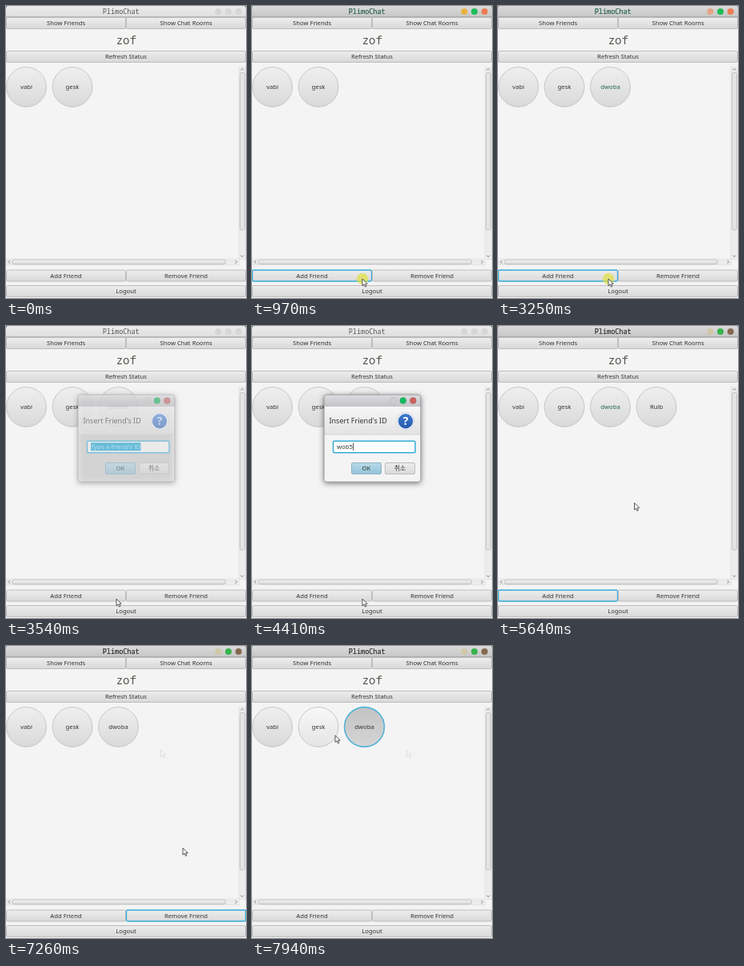
These frames come from a looping animation (300x366 px, 7.99 s). An HTML page with a canvas:

```html
<!DOCTYPE html>
<html lang="en">
<head>
<meta charset="utf-8">
<title>PlimoChat</title>
<style>
html, body { margin: 0; width: 100%; height: 100%; overflow: hidden; background: #f4f4f4; }
canvas { display: block; width: 300px; height: 366px; }
</style>
</head>
<body>
<canvas id="stage"></canvas>
<script>
const W = 300, H = 366, LOOP = 7990;
const SANS = '"Noto Sans", "Noto Sans CJK KR", "Noto Sans CJK", sans-serif';
const MONO = '"Noto Sans Mono", monospace';
const UI = '7.7px ' + SANS;
const BLUE = '#35acd8';
const canvas = document.getElementById('stage');
const ctx = canvas.getContext('2d');
const ratio = window.devicePixelRatio || 1;
canvas.width = W * ratio;
canvas.height = H * ratio;

// Piecewise linear track: rows of [time, value, ...]
function track(rows, t) {
  if (t <= rows[0][0]) return rows[0].slice(1);
  for (let i = 1; i < rows.length; i++) {
    const a = rows[i - 1], b = rows[i];
    if (t < b[0]) {
      const k = (t - a[0]) / (b[0] - a[0]);
      return a.slice(1).map((v, j) => v + (b[j + 1] - v) * k);
    }
  }
  return rows[rows.length - 1].slice(1);
}

const pointerPath = [
  [90, 246, 368], [180, 225, 349], [300, 182, 336], [400, 148, 338], [480, 138, 342],
  [5440, 138, 342], [5560, 152, 290], [5700, 184, 172], [5820, 198, 112], [5900, 199, 107],
  [6040, 198, 109], [6120, 193, 130], [6230, 184, 249],
  [6400, 177, 306], [6520, 180, 324], [6680, 245, 333],
  [7090, 245, 333], [7220, 232, 280], [7370, 192, 182], [7520, 150, 118], [7620, 141, 107],
  [7780, 140, 107], [7880, 129, 109], [7910, 117, 110], [7940, 104, 112]
];
const focusLevel = [
  [730, 0], [880, 1], [1090, 1], [1260, 0], [2410, 0], [2450, 1],
  [3390, 1], [3540, 0], [4769, 0], [4770, 1]
];
const dialogLevel = [
  [1090, 0], [1400, 1], [2400, 1], [2450, 0], [3390, 0], [3660, 1], [4769, 1], [4770, 0]
];
const clicks = [[730, 1080], [3250, 3400], [5880, 5980], [6850, 6960], [7640, 7740]];
const typing = [
  { steps: [1570, 1670, 1770, 1870, 2010], word: 'wob4', end: 2500 },
  { steps: [3830, 3920, 4010, 4110, 4410], word: 'wob5', end: 4800 }
];
const friends = [
  { name: 'vabi', x: 25.5, from: 0, to: LOOP },
  { name: 'gesk', x: 83, from: 0, to: LOOP, lit: 7900 },
  { name: 'dwoba', x: 140.5, from: 2430, to: LOOP, pick: [7640, LOOP], tint: 7100 },
  { name: 'Rulb', x: 198, from: 4770, to: 6960, pick: [5880, 6850] }
];

const within = (t, a, b) => t >= a && t < b;

function shade(y0, y1, top, bottom) {
  const g = ctx.createLinearGradient(0, y0, 0, y1);
  g.addColorStop(0, top);
  g.addColorStop(1, bottom);
  return g;
}

function paint(fill, stroke, line) {
  if (fill) { ctx.fillStyle = fill; ctx.fill(); }
  if (stroke) { ctx.strokeStyle = stroke; ctx.lineWidth = line; ctx.stroke(); }
}

function box(x, y, w, h, r, fill, stroke, line = 1) {
  ctx.beginPath();
  ctx.roundRect(x, y, w, h, r);
  paint(fill, stroke, line);
}

function disc(x, y, r, fill, stroke, line = 1) {
  ctx.beginPath();
  ctx.arc(x, y, r, 0, Math.PI * 2);
  paint(fill, stroke, line);
}

function label(s, x, y, color = '#333', font = UI, align = 'center') {
  ctx.font = font;
  ctx.textAlign = align;
  ctx.fillStyle = color;
  ctx.fillText(s, x, y);
}

function button(s, x, y, w, h, state = '') {
  const fill = state === 'pressed' ? shade(y, y + h, '#cbcbcb', '#d8d8d8')
    : state === 'default' ? shade(y, y + h, '#b9dcea', '#93c2d8')
    : shade(y, y + h, '#eeeeee', '#d8d8d8');
  const ring = state === 'focus' || state === 'pressed';
  box(x + .5, y + .5, w - 1, h - 1, 1.5, fill, ring ? BLUE : state ? '#8fb3c3' : '#bdbdbd', ring ? 1.3 : 1);
  label(s, x + w / 2, y + h / 2 + 2.8);
}

function arrow(x, y, turn) {
  ctx.save();
  ctx.translate(x, y);
  ctx.rotate(turn);
  ctx.beginPath();
  ctx.moveTo(-2, 1);
  ctx.lineTo(0, -1);
  ctx.lineTo(2, 1);
  paint(null, '#777', .9);
  ctx.restore();
}

function scrollbars() {
  box(291, 76.5, 8.5, 241, 0, '#ececec', '#e0e0e0', .6);
  box(0.5, 317, 291, 7.5, 0, '#ececec', '#e0e0e0', .6);
  box(292.5, 83.5, 6, 197, 2, '#e3e3e3', '#b9b9b9', .8);
  box(8, 318, 266.5, 5.5, 2, shade(318, 324, '#f0f0f0', '#d9d9d9'), '#b9b9b9', .8);
  arrow(295.3, 79.5, 0);
  arrow(295.3, 313.5, Math.PI);
  arrow(4, 320.8, -Math.PI / 2);
  arrow(287.5, 320.8, Math.PI / 2);
}

function titleBar(t, level) {
  ctx.fillStyle = '#56685f';
  ctx.fillRect(0, 0, W, 6);
  box(0, 0, W, 14, [3, 3, 0, 0], shade(0, 14, '#ececec', '#dedede'));
  ctx.globalAlpha = level;
  box(0, 0, W, 14, [3, 3, 0, 0], shade(0, 14, '#dadada', '#c6c6c6'));
  ctx.globalAlpha = 1;
  ctx.fillStyle = '#8e8e8e';
  ctx.fillRect(0, 13.5, W, .9);

  const late = t >= 4770;
  const lights = late ? ['#d0c8a8', '#35b44c', '#85694f']
    : [t < 2400 ? '#e9b13f' : '#e3a487', '#20bb58', '#ee7d55'];
  lights.forEach((color, i) => {
    const x = 265.3 + 12.7 * i;
    disc(x, 7, 4, '#d6d6d6');
    ctx.globalAlpha = level;
    disc(x, 7, 4, color);
    ctx.globalAlpha = 1;
  });
  const name = 'PlimoChat', font = '8.5px ' + MONO;
  label(name, 143.7, 9.6, '#555', font);
  ctx.globalAlpha = level;
  label(name, 143.7, 9.6, late ? '#333' : '#28725a', font);
  ctx.globalAlpha = 1;
}

function friend(f, t, px, py) {
  if (!within(t, f.from, f.to)) return;
  const y = 101.5;
  const picked = f.pick && within(t, f.pick[0], f.pick[1]);
  const hover = Math.hypot(px - f.x, py - y) < 25 || t > f.lit;
  let tones = ['#efefef', '#d9d9d9'];
  if (picked) tones = hover ? ['#cecece', '#dadada'] : ['#c3c3c3', '#d5d5d5'];
  else if (hover) tones = ['#f8f8f8', '#e4e4e4'];
  disc(f.x, y, 24.9, shade(76, 127, ...tones), picked ? '#55b3d8' : '#bcbcbc', picked ? 1.6 : .8);
  label(f.name, f.x, y + 2.9, t < f.tint ? '#1f6656' : '#333');
}

function mainWindow(t, level, px, py) {
  ctx.fillStyle = '#f4f4f4';
  ctx.fillRect(0, 0, W, H);
  titleBar(t, level);
  button('Show Friends', 0, 14, 150, 15);
  button('Show Chat Rooms', 150, 14, 150, 15);
  label('zof', 150.3, 48, '#5b534c', '14px ' + MONO);
  button('Refresh Status', 0, 56, W, 15);
  scrollbars();
  friends.forEach(f => friend(f, t, px, py));

  const addFocus = within(t, 730, 5880) && level > .5;
  const removeState = within(t, 6850, 6960) ? 'pressed' : within(t, 6960, 7640) ? 'focus' : '';
  button('Add Friend', 0, 330.5, 150, 15, addFocus ? 'focus' : '');
  button('Remove Friend', 150, 330.5, 150, 15, removeState);
  button('Logout', 0, 350, W, 15);
}

function field(t) {
  box(101.5, 144.3, 102.5, 14.4, 1.5, '#fff', BLUE, 1.5);
  const job = typing.find(j => t < j.end);
  if (!job) return;
  const done = job.steps.filter(s => t >= s).length;
  if (!done) {
    const hint = "Type a friend's ID";
    ctx.font = UI;
    ctx.fillStyle = '#0096c9';
    ctx.fillRect(106, 146.3, ctx.measureText(hint).width, 10);
    label(hint, 106, 154, '#fff', UI, 'left');
    return;
  }
  const text = job.word.slice(0, done - 1);
  label(text, 106, 154, '#333', UI, 'left');
  ctx.fillStyle = '#222';
  ctx.fillRect(106.5 + ctx.measureText(text).width, 146.5, .8, 9.5);
}

function dialog(t, level) {
  if (level <= 0) return;
  ctx.save();
  ctx.globalAlpha = level;
  ctx.shadowColor = 'rgba(0,0,0,.55)';
  ctx.shadowBlur = 7 * ratio;
  ctx.shadowOffsetY = 1.5 * ratio;
  box(90, 86, 121, 109.5, 3, '#f4f4f4');
  ctx.shadowColor = 'transparent';
  box(90, 86, 121, 15, [3, 3, 0, 0], shade(86, 101, '#dcdce0', '#c3c3c8'));
  const lights = t < 3000 ? ['#cfcfcf', '#30c04c', '#b85f5f'] : ['#cfcfcf', '#14ba60', '#cb6262'];
  lights.forEach((c, i) => disc(176.3 + 12.5 * i, 93.6, 4, c, 'rgba(0,0,0,.12)', .6));
  box(90, 101, 121, 35, 0, shade(101, 136, '#f6f6f6', '#e3e3e3'));
  ctx.fillStyle = '#cdcdcd';
  ctx.fillRect(90, 135.6, 121, .8);
  label("Insert Friend's ID", 96.5, 122.3, '#333', '500 9px ' + SANS, 'left');
  disc(192, 119.3, 10.8, '#fafafa', '#b9c3d3', .7);
  disc(192, 119.3, 9.2, shade(110, 129, '#3f7bd0', '#2558ab'));
  label('?', 192, 124.4, '#fff', 'bold 14px ' + SANS);
  field(t);
  button('OK', 124, 171, 38, 15, 'default');
  button('취소', 166, 171, 38, 15);
  box(90.2, 86.2, 120.6, 109.1, 3, null, '#8b8b8f', .7);
  ctx.restore();
}

function pointer(x, y) {
  const shape = [[0, 0], [0, 8.6], [2, 6.8], [3.4, 10], [4.9, 9.3], [3.5, 6.3], [6.2, 6.2]];
  ctx.beginPath();
  shape.forEach(([dx, dy]) => ctx.lineTo(x + dx, y + dy));
  ctx.closePath();
  ctx.lineJoin = 'round';
  paint('#fff', '#444', .9);
}

function draw(t) {
  ctx.setTransform(ratio, 0, 0, ratio, 0, 0);
  const [px, py] = track(pointerPath, t);
  const [level] = track(focusLevel, t);
  mainWindow(t, level, px, py);
  dialog(t, track(dialogLevel, t)[0]);
  if (t > 6150) {
    ctx.globalAlpha = .13;
    pointer(193.5, 130);
    ctx.globalAlpha = 1;
  }
  if (clicks.some(([a, b]) => within(t, a, b))) disc(px, py, 7.2, 'rgba(226,226,60,.68)');
  if (t >= 100) pointer(px, py);
}

const start = performance.now();
function loop() {
  draw((performance.now() - start) % LOOP);
  requestAnimationFrame(loop);
}
loop();
</script>
</body>
</html>
```
